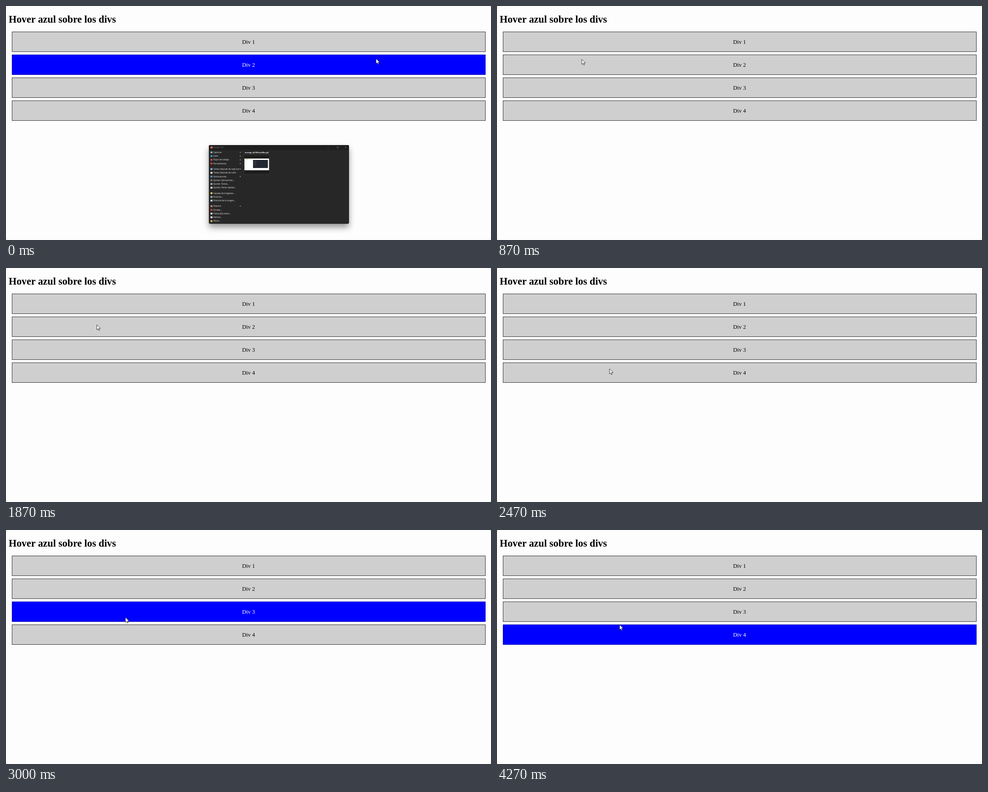
Write an HTML page that moves like this. It is 1076 px wide and 520 px high and loops after 4.34 s.

```html
<!DOCTYPE html>
<html lang="es">
<head>
<meta charset="utf-8">
<title>Hover azul sobre los divs</title>
<style>
  html, body { margin: 0; width: 100%; height: 100%; overflow: hidden; background: #f3f3ea; }
  svg { display: block; width: 1076px; height: 520px; }
  .page { font-family: "Liberation Serif", "Times New Roman", serif; }
  .box rect { fill: #cfcfcf; stroke: #303030; }
  .box text { font-size: 12.7px; text-anchor: middle; }
  .box.hover rect { fill: #00f; stroke: #0000b0; }
  .box.hover text { fill: #fff; }
  #window { font: 4.5px "Open Sans", sans-serif; fill: #e6e6e6; filter: drop-shadow(0 8px 7px rgba(0, 0, 0, .4)); }
</style>
</head>
<body>
<svg viewBox="0 0 1076 520">
  <rect x=".5" y=".5" width="1075" height="519" rx="7" fill="#fdfdfd"/>
  <g class="page">
    <text x="6" y="37" font-size="22.4" font-weight="bold">Hover azul sobre los divs</text>
    <g id="boxes"></g>
  </g>
  <g id="window">
    <rect x="450" y="309" width="311" height="175" rx="3" fill="#272727"/>
    <path d="M450 320V312a3 3 0 0 1 3-3H758a3 3 0 0 1 3 3V320Z" fill="#1e1e1e"/>
    <circle cx="456" cy="314.3" r="2.6" fill="#d9604c"/>
    <text x="460" y="316" fill="#777">ShareX 16.1</text>
    <path d="M713 314.5h3M734.5 312.5h3v3h-3zM751.5 312.5l3 3m0-3l-3 3" fill="none" stroke="#777" stroke-width=".6"/>
    <g id="menu"></g>
    <text x="556" y="327" font-size="4.2" font-weight="bold" text-anchor="middle" fill="#fff">msedge_BzTROwrGBm.gif</text>
    <rect x="527.5" y="330.5" width="57.5" height="43.5" rx="1" fill="#1d1d1d" stroke="#444" stroke-width=".7"/>
    <rect x="529" y="339" width="54.5" height="26" fill="#fff"/>
    <rect x="531" y="340" width="7" height="1" fill="#d9a36a"/>
    <rect x="548" y="342" width="33" height="18" fill="#222630"/>
    <path d="M549 345h7m-7 3h6m-6 3h7m-7 3h5" stroke="#555b66" stroke-width=".7"/>
  </g>
  <path id="cursor" d="M0 0V11.4L2.7 8.9L4.5 13L6.2 12.3L4.5 8.3H8.1Z" fill="#fff" stroke="#111" stroke-width=".8"/>
</svg>
<script>
const LOOP = 4340, STEP = 66.75;
const byId = id => document.getElementById(id);
const boxTop = i => 57 + 51 * i;

byId('boxes').innerHTML = [0, 1, 2, 3].map(i => `<g class="box">
  <rect x="13.5" y="${boxTop(i) + .5}" width="1050" height="44"/>
  <text x="538" y="${boxTop(i) + 26.6}">Div ${i + 1}</text></g>`).join('');
const boxes = [...document.querySelectorAll('.box')];

// Icon colour, label, and whether the entry opens a submenu; null leaves a gap.
const menu = [
  ['#9fb0bd', 'Capturar', 1], ['#3c95d8', 'Subir', 1],
  ['#c94850', 'Flujos de trabajo', 1], ['#d64532', 'Herramientas', 1], null,
  ['#8eb4d6', 'Tareas después de capturar', 1], ['#e2e8ec', 'Tareas después de subir'],
  ['#5b93cc', 'Destinaciones', 1], ['#777', 'Ajustes: Aplicaciones...'],
  ['#aaa', 'Ajustes: Tareas...'], ['#ddd', 'Ajustes: Teclas rápidas...'], null,
  ['#dfc65a', 'Carpeta de imágenes...'], ['#a5adb5', 'Historial...'],
  ['#cbd3d8', 'Historial de la imagen...'], null,
  ['#e07a78', 'Depurar', 1], ['#e03545', 'Donate...'],
  ['#ddd', 'Follow @Lumbra...'], ['#eee', 'Parlova...'], ['#d7ad4b', 'About...']
];
let rowY = 325.3;
byId('menu').innerHTML = menu.map(entry => {
  if (!entry) { rowY += 4; return ''; }
  const [color, label, submenu] = entry, y = rowY;
  rowY += 8.27;
  return `<rect x="453.7" y="${y - 2}" width="4.4" height="4" rx=".8" fill="${color}"/>
    <text x="460" y="${y + 1.6}">${label}</text>` +
    (submenu ? `<path d="M519 ${y - 1.3}l1.7 1.3l-1.7 1.3z"/>` : '');
}).join('');

// Pointer path: step, x, y
const path = [
  [0, 821, 117], [6, 477.5, 379], [8, 400, 331], [14, 172, 98], [15, 168.5, 92],
  [17, 165, 80], [22, 180, 232], [25, 192, 78], [27, 198, 104], [28, 201.5, 126],
  [31, 215, 235], [34, 232, 125], [36, 245, 207], [37, 249.5, 224], [38, 252, 234],
  [41, 258, 128], [44, 263, 180], [45, 265, 194], [47, 268, 222], [50, 268, 180],
  [53, 270, 225], [58, 270, 225], [64, 272, 210.5]
];
const slope = (i, axis) => (path[i + 1][axis] - path[i][axis]) / (path[i + 1][0] - path[i][0]);

function tangent(i, axis) {
  if (i === 0 || i === path.length - 1) return 0;
  const a = slope(i - 1, axis), b = slope(i, axis);
  return a * b <= 0 ? 0 : 2 * a * b / (a + b);
}

// Monotone cubic interpolation, so the pointer never overshoots a turning point.
function pointer(step) {
  let i = 0;
  while (i < path.length - 2 && path[i + 1][0] <= step) i++;
  const span = path[i + 1][0] - path[i][0], u = (step - path[i][0]) / span;
  const ease = u * u * (3 - 2 * u);
  return [1, 2].map(axis =>
    path[i][axis] * (1 - ease) + path[i + 1][axis] * ease +
    span * u * (1 - u) * ((1 - u) * tangent(i, axis) - u * tangent(i + 1, axis)));
}

function draw(time) {
  const step = Math.min(64, Math.floor((time % LOOP + 5) / STEP));
  const [x, y] = pointer(step);
  byId('cursor').setAttribute('transform', `translate(${x} ${y})`);

  // The highlight trails the pointer by one step.
  const hitY = pointer(Math.max(0, step - 1))[1];
  boxes.forEach((box, i) =>
    box.classList.toggle('hover', hitY >= boxTop(i) && hitY < boxTop(i) + 45));

  const scale = 1 - .08 * step;
  const panel = byId('window');
  panel.style.display = step < 3 ? '' : 'none';
  panel.style.opacity = [1, .45, .1][step] ?? 0;
  panel.setAttribute('transform',
    `translate(605 ${484 + 8 * step}) scale(${scale}) translate(-605 -484)`);
}

const start = performance.now();
function tick() {
  draw(performance.now() - start);
  requestAnimationFrame(tick);
}
tick();
</script>
</body>
</html>
```
